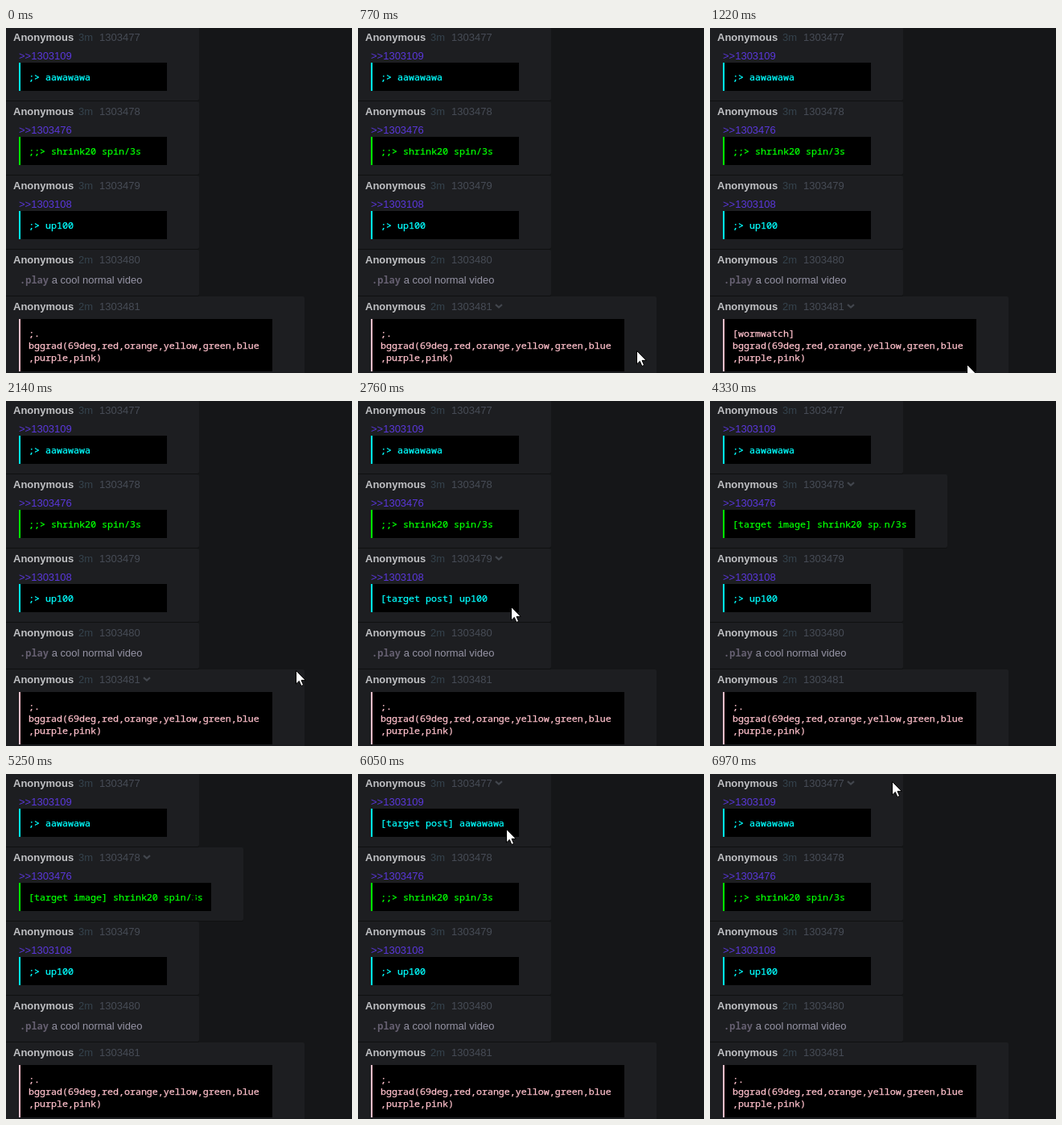
Animation of 430 by 428 pixels, one loop 7020 ms. Source, as an HTML page:

```html
<!DOCTYPE html>
<html lang="en">
<head>
<meta charset="utf-8">
<title>Thread</title>
<style>
  html, body { margin: 0; width: 100%; height: 100%; overflow: hidden; background: #151618; }
  body { position: relative; font: 13px/15px "Liberation Sans", Arial, sans-serif; cursor: default; }
  main {
    position: absolute; top: -1px; left: 0; display: flex; flex-direction: column;
    align-items: flex-start; gap: 1px; white-space: pre;
  }
  .post {
    position: relative; box-sizing: border-box; min-width: 240px; padding: 28px 40px 12px 16px;
    background: #1d1e21; border-radius: 0 2px 2px 0; box-shadow: 0 1px #0f1011;
  }
  .name, .time, .num, .chevron { position: absolute; top: 5px; }
  .name { left: 9px; font-weight: bold; color: #c0c1c4; }
  .time { left: 90px; color: #35434d; }
  .num { left: 116px; color: #474c56; }
  .chevron { left: 169px; top: 8px; }
  .link { height: 16px; color: #5a37da; }
  .text { margin: 2px 0 0 1px; color: #9694a5; }
  .text b { font: bold 12px/15px "Noto Sans Mono", monospace; color: #655f70; }
  .code {
    box-sizing: border-box; width: max-content; min-width: 184px;
    padding: 10px; border-left: 2px solid; background: #000;
    font: 11.667px/15px "Noto Sans Mono", "DejaVu Sans Mono", monospace;
    -webkit-text-stroke: 0.25px;
  }
  .wide { min-width: 315px; }
  .pointer { position: absolute; left: 0; top: 0; overflow: visible; }
</style>
</head>
<body>
<main></main>
<svg class="pointer" id="arrow" width="14" height="21">
  <path d="M-.5 .5V17L3.3 13.4L5.9 19.5L8.6 18.3L6 12.4H11.2Z" fill="#fff" stroke="#000"/>
</svg>
<svg class="pointer" id="beam" width="1" height="1" fill="none">
  <path id="stem" d="M-3 -7.5H-1L0 -6.5L1 -7.5H3M0 -6.5V6.5M-3 7.5H-1L0 6.5L1 7.5H3" stroke="#000" stroke-width="3"/>
  <use href="#stem" style="stroke:#fff;stroke-width:1.3"/>
</svg>
<script>
const LOOP = 7020;
const STEP = 50;
const PADDING = 10;
const arrow = document.getElementById("arrow");
const beam = document.getElementById("beam");

const gradient = "\nbggrad(69deg,red,orange,yellow,green,blue\n,purple,pink)";
const posts = [
  { link: 1303109, color: "#0ff", idle: ";>", hover: "[target post]", command: " aawawawa" },
  { link: 1303476, color: "#0f0", idle: ";;>", hover: "[target image]", command: " shrink20 spin/3s" },
  { link: 1303108, color: "#0ff", idle: ";>", hover: "[target post]", command: " up100" },
  { text: "<b>.play</b> a cool normal video" },
  { color: "#ffc0cb", idle: ";.", hover: "[wormwatch]", command: gradient, wide: true }
];

// The pointer starts offscreen, then follows one curve per move and rests in between
const entry = [385, 440];
const moves = [
  { start: 570, end: 1220, via: [320, 360], to: [320, 417] },
  { start: 1840, end: 2490, via: [460, 330], to: [205, 258] },
  { start: 2560, end: 2960, via: [189, 255], to: [186, 253] },
  { start: 3460, end: 4130, via: [279, 147], to: [188, 155] },
  { start: 4180, end: 4580, via: [222, 160], to: [237, 156] },
  { start: 5150, end: 5850, via: [234, 166], to: [190, 71] },
  { start: 5900, end: 6050, via: [188, 70], to: [185, 68] },
  { start: 6670, end: 6970, via: [203, 40], to: [227, 9] }
];

function add(parent, className, html = "") {
  const el = document.createElement("div");
  el.className = className;
  el.innerHTML = html;
  return parent.appendChild(el);
}

function build(post, i) {
  const el = add(document.querySelector("main"), "post");
  add(el, "name", "Anonymous");
  add(el, "time", i < 3 ? "3m" : "2m");
  add(el, "num", 1303477 + i);
  post.chevron = add(el, "chevron",
    '<svg width="12" height="8" style="display:block"><path d="M2 2.2L6 5.6L10 2.2" fill="none" stroke="#42464d" stroke-width="2.2"/></svg>');
  if (post.link) add(el, "link", "&gt;&gt;" + post.link);
  if (post.text) add(el, "text", post.text);
  if (post.command) {
    post.code = add(el, post.wide ? "code wide" : "code");
    post.code.style.color = post.color;
    post.code.textContent = post.hover + post.command;
    post.codeArea = post.code.getBoundingClientRect();
  }
  post.area = el.getBoundingClientRect();
}

function pointerAt(t) {
  const i = moves.findLastIndex(move => move.start <= t);
  if (i < 0) return entry;
  const { start, end, via, to } = moves[i];
  const from = i ? moves[i - 1].to : entry;
  const steps = Math.floor((end - start) / STEP) + 1;
  const u = Math.min(1, (Math.floor((t - start) / STEP) + 1) / steps);
  return from.map((a, k) => Math.round((1 - u) ** 2 * a + 2 * u * (1 - u) * via[k] + u * u * to[k]));
}

const inside = ([x, y], area, inset = 0) =>
  x >= area.left + inset && x < area.right - inset &&
  y >= area.top + inset && y < area.bottom - inset;

const show = (el, visible) => { el.style.visibility = visible ? "visible" : "hidden"; };

function draw(t) {
  const pointer = pointerAt(t);
  let overText = false;
  for (const post of posts) {
    show(post.chevron, inside(pointer, post.area) && t >= moves[0].start);
    if (!post.code) continue;
    const open = inside(pointer, post.codeArea) && t >= moves[0].start;
    const label = (open ? post.hover : post.idle) + post.command;
    if (post.code.textContent !== label) post.code.textContent = label;
    overText ||= open && inside(pointer, post.codeArea, PADDING);
  }
  for (const el of [arrow, beam]) {
    show(el, t >= moves[0].start && (el === beam) === overText);
    el.style.transform = `translate(${pointer[0]}px,${pointer[1]}px)`;
  }
}

posts.forEach(build);
const began = performance.now();
function tick() {
  draw((performance.now() - began) % LOOP);
  requestAnimationFrame(tick);
}
tick();
</script>
</body>
</html>
```
